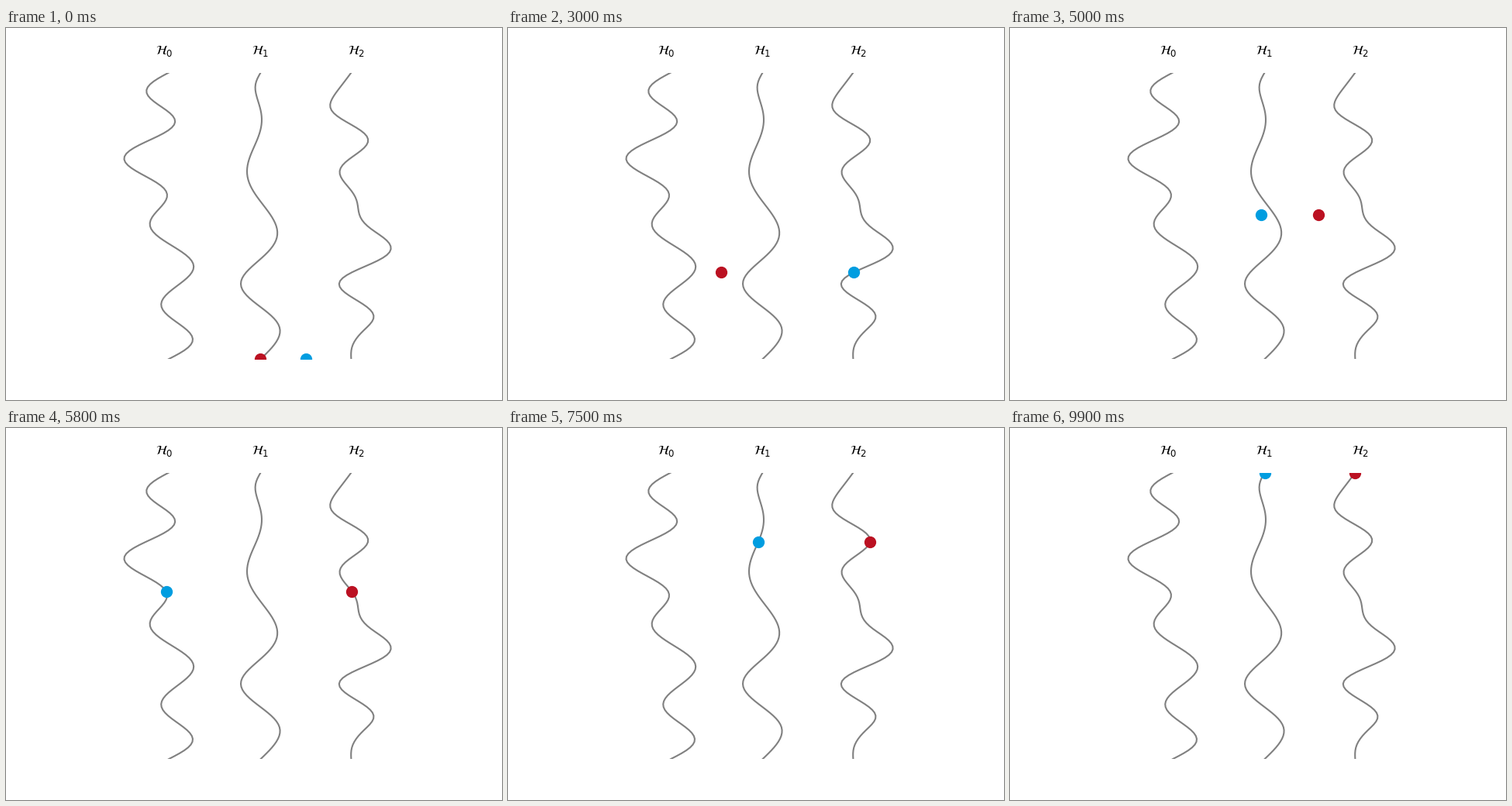
Animation of 640x480 px, one loop 10 s. Source, as a matplotlib script:

```python
import numpy as np
import matplotlib.pyplot as plt
from matplotlib.animation import FuncAnimation

FRAMES = 100
LEFT, RIGHT, TOP, BOTTOM = 80, 576, 57.6, 427.2
RED, BLUE = "#bb1122", "#009de0"


def wave(y, base, turns, via=()):
    """Smooth sine series pinned to base at both ends.

    turns: (y, x) where the curve turns back; via: (y, x) it passes through.
    """
    k = np.arange(1, 41)
    weight = k ** -3.0

    def phase(v):
        return np.pi * np.outer((np.asarray(v) - TOP) / (BOTTOM - TOP), k)

    pts = np.array(list(turns) + list(via))
    turn_y = [p[0] for p in turns]
    rows = np.vstack([np.sin(phase(pts[:, 0])), k * np.cos(phase(turn_y))])
    goal = np.concatenate([pts[:, 1] - base, np.zeros(len(turn_y))])
    coef = np.linalg.lstsq(rows * weight, goal, rcond=None)[0] * weight
    return base + np.sin(phase(y)) @ coef


ys = np.linspace(BOTTOM, TOP, FRAMES)
curves = np.array([
    wave(ys, 209.9,
         [(81.5, 181.2), (120.5, 218.2), (168.5, 152.4), (216, 208),
          (253, 185.6), (308, 242.2), (356.8, 200.2), (402, 241)]),
    wave(ys, 328.5,
         [(77, 321.6), (118.5, 330), (185, 311), (264.5, 350.2),
          (330, 303), (391, 353.6)],
         [(304, 321.6)]),
    wave(ys, 445.4,
         [(100, 418.2), (145, 467.3), (186, 430.5), (284, 496.7),
          (330.5, 429.8), (372.5, 474.5)],
         [(210.7, 446.1), (221.9, 452.2), (243, 456.8), (262.9, 476.2),
          (274.1, 491.2), (386.1, 465.8), (402, 451.2), (415, 445.7)]),
])

# (start frame, curve index) for each dot
RED_PLAN = [(0, 0), (30, 1), (50, 2)]
BLUE_PLAN = [(0, 2), (50, 0), (70, 1)]


def track(plan):
    """Follow the planned curves, halfway between two at each switch."""
    state = np.zeros(FRAMES, int)
    for start, idx in plan:
        state[start:] = idx
    now = np.arange(FRAMES)
    return (curves[state, now] + curves[np.roll(state, 1), now]) / 2


paths = [track(RED_PLAN), track(BLUE_PLAN)]

fig = plt.figure(figsize=(6.4, 4.8), dpi=100)
ax = fig.add_axes((0.125, 0.11, 0.775, 0.77))
ax.set_xlim(LEFT, RIGHT)
ax.set_ylim(BOTTOM, TOP)
ax.axis("off")

for i, xs in enumerate(curves):
    ax.plot(xs, ys, color="gray", lw=1.5)
    ax.text(0.25 * (i + 1), 1.065, rf"$\mathcal{{H}}_{i}$", fontsize=12,
            ha="center", va="baseline", transform=ax.transAxes)

dots = [ax.plot([], [], "o", ms=10, color=c, zorder=3)[0] for c in (RED, BLUE)]


def update(n):
    for dot, xs in zip(dots, paths):
        dot.set_data([xs[n]], [ys[n]])
    return dots


anim = FuncAnimation(fig, update, frames=FRAMES, interval=100,
                     repeat=True, repeat_delay=0)
plt.show()
```
